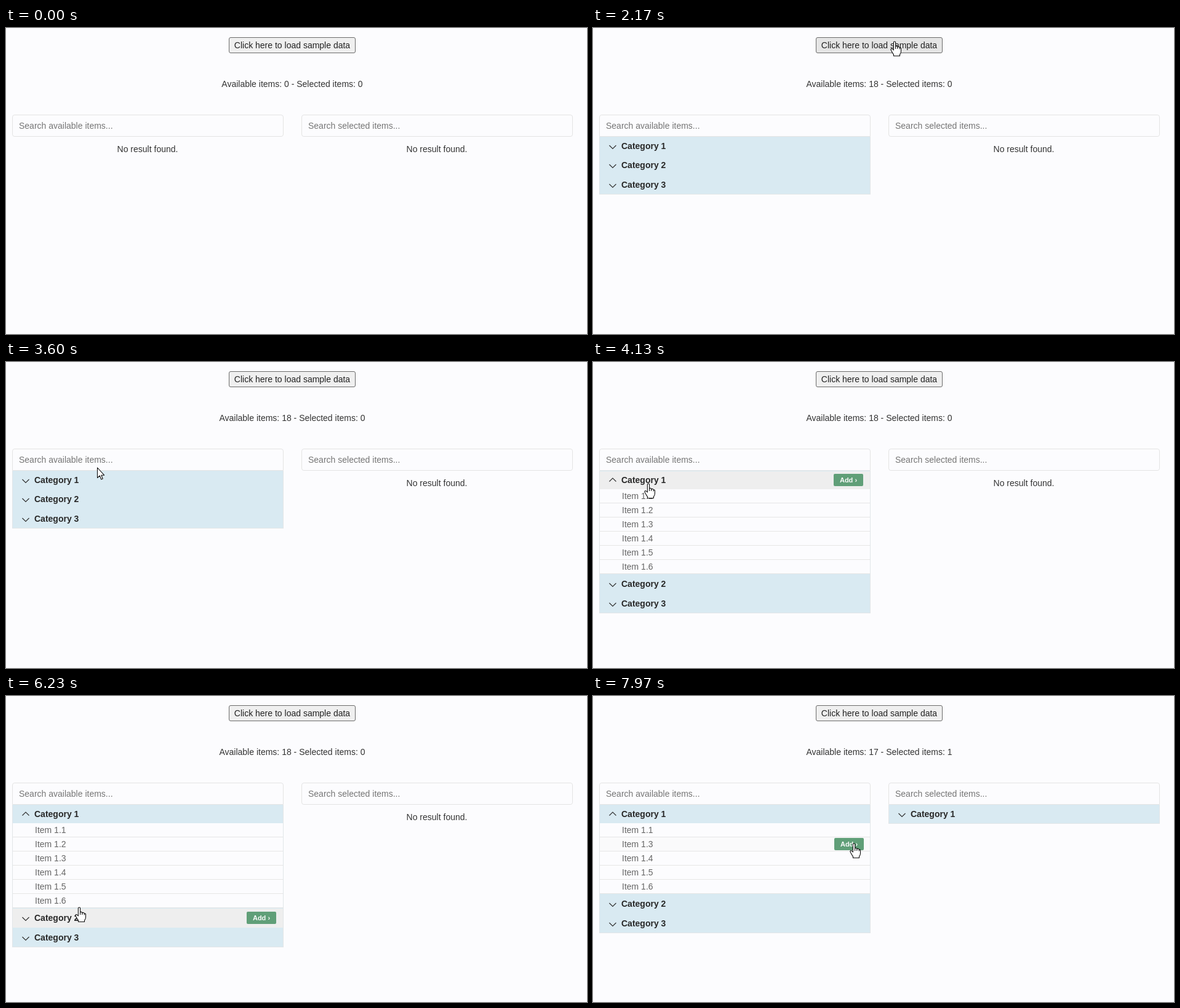
Animation, 944 px wide and 498 px high, one loop 8 s. Source, as an HTML page:

```html
<!DOCTYPE html>
<html lang="en">
<head>
<meta charset="utf-8">
<title>Dual list selector</title>
<style>
html, body { margin: 0; width: 100%; height: 100%; overflow: hidden; background: #fcfcfe; }
#stage { position: absolute; left: 0; top: 0; width: 944px; height: 498px; overflow: hidden;
  font: 14px/16px "Liberation Sans", Arial, sans-serif; color: #333; }
#view div, #view svg, #cursor { position: absolute; box-sizing: border-box; white-space: pre; }
.center { text-align: center; }
.load { left: 362px; top: 15px; width: 206px; height: 26px; line-height: 24px;
  border: 1px solid #6b6b6b; border-radius: 3px; background: #efefef; color: #222; }
.load.over { background: #e5e5e5; }
.load.down { background: #f5f5f5; }
.search { top: 141px; width: 441px; height: 36px; border: 1px solid #e4e4e4; border-radius: 4px;
  padding: 0 10px; line-height: 34px; color: #757575; }
.search.open { border-radius: 4px 4px 0 0; }
.list { top: 177px; width: 441px; border: solid #e2e6e8; border-width: 0 1px 1px; overflow: hidden; }
.cat { left: 0; width: 439px; background: #d9eaf2; }
.cat.over { background: #eee; border-top: 1px solid #d9eaf2; }
.name { font-weight: bold; color: #282828; }
.item { color: #666; }
.lit { left: 0; width: 439px; background: #fafafb; }
.rule { left: 0; width: 439px; height: 1px; background: #e6e6e6; }
.add { width: 48px; height: 20px; border-radius: 2px; background: #609f78; color: #f8faf9;
  font: bold 11px/20px "Liberation Sans", Arial, sans-serif; text-align: center; }
#cursor { left: 0; top: 0; overflow: visible; }
</style>
</head>
<body>
<div id="stage">
  <div id="view"></div>
  <svg id="cursor" width="1" height="1" fill="#fff" stroke="#111" stroke-width="1.1" stroke-linejoin="round">
    <path id="arrow" d="M.5 0V16.5L4.3 13L6.7 19L9.2 18L6.9 12.2H11.6Z"/>
    <g id="hand">
      <path d="M-1.6 1.6Q-1.6 0 0 0Q1.6 0 1.6 1.6V8Q2.2 7 3.6 7.5Q4.8 8 4.8 9Q6 8 7.3 8.7Q8.4 9.3 8.3 10.3Q10 9.7 10.5 11V16Q10.5 19 8.5 21V23.5H-1.5V21Q-3 19.5-5.5 14.5Q-6.8 12.3-5.3 11.7Q-3.8 11.2-1.6 14Z"/>
      <path fill="none" d="M1.6 8V12M4.8 9V12M8.3 10.3V12.5"/>
    </g>
  </svg>
</div>
<script>
const LOOP = 8000, APPEAR = 430, PRESS = 970, LOAD = 1970, EXPAND = 3860, ADD = 7480;
const LEFT = 10, RIGHT = 480, TOP = 177, FIRST_ITEM = 207, ROW = 23;

// Each move: start, end, from x, y, to x, y
const MOVES = [
  [3000, 3800, 490, 22, 90, 198],
  [4570, 5300, 90, 198, 121, 390],
  [5450, 6210, 121, 390, 119, 344],
  [6230, 7150, 119, 344, 424, 240]
];

const view = document.getElementById('view');
const cursor = document.getElementById('cursor');
const arrow = document.getElementById('arrow');
const hand = document.getElementById('hand');

function pointerAt(t) {
  let point = { x: 490, y: 22 };
  for (const [start, end, x0, y0, x1, y1] of MOVES) {
    if (t < start) break;
    const p = Math.min(1, (t - start) / (end - start));
    const e = (1 - Math.cos(Math.PI * p)) / 2;
    point = { x: x0 + (x1 - x0) * e, y: y0 + (y1 - y0) * e };
  }
  return point;
}

// Rows of the left list, in stage coordinates
function leftRows(t) {
  if (t < LOAD) return [];
  const numbers = t < EXPAND ? [] : t < ADD ? [1, 2, 3, 4, 5, 6] : [1, 3, 4, 5, 6];
  const shift = numbers.length * ROW;
  const cat = (n, mid, top, bottom) => ({ cat: true, label: 'Category ' + n, mid, top, bottom, open: n === 1 && shift > 0 });
  const item = (n, i) => {
    const top = FIRST_ITEM + i * ROW;
    return { label: 'Item 1.' + n, mid: top + 11, top, bottom: top + ROW };
  };
  return [
    cat(1, 192, TOP, FIRST_ITEM),
    ...numbers.map(item),
    cat(2, 223 + shift, 207 + shift, 239 + shift),
    cat(3, 255 + shift, 239 + shift, 271 + shift)
  ];
}

const box = (cls, style, text = '') => `<div class="${cls}" style="${style}">${text}</div>`;
const label = (cls, x, mid, text) => box(cls, `left:${x}px;top:${mid - 8}px`, text);
const centered = (mid, x, width, text) => box('center', `left:${x}px;top:${mid - 8}px;width:${width}px`, text);

function chevron(y, open) {
  const d = open ? 'M.5 6.5L6 1L11.5 6.5' : 'M.5 1L6 6.5L11.5 1';
  return `<svg style="left:15px;top:${y}px" width="12" height="8"><path d="${d}" fill="none" stroke="#333" stroke-width="1.2"/></svg>`;
}

function rowHtml(row, over) {
  const top = row.top - TOP, mid = row.mid - TOP, height = row.bottom - row.top;
  const area = `top:${top}px;height:${height}px`;
  const add = over ? box('add', `left:${row.cat ? 380 : 381}px;top:${mid - 10}px`, 'Add ›') : '';
  if (row.cat) {
    return box('cat' + (over ? ' over' : ''), area) +
      chevron(mid - (row.open ? 4 : 2), row.open) + label('name', 35, mid, row.label) + add;
  }
  return (over ? box('lit', area) : '') + box('rule', `top:${top + height - 1}px`) +
    label('item', 36, mid, row.label) + add;
}

function panel(x, word, rows, hovered) {
  const search = box('search' + (rows.length ? ' open' : ''), `left:${x}px`, `Search ${word} items...`);
  if (!rows.length) return search + centered(197, x, 440, 'No result found.');
  const height = rows[rows.length - 1].bottom - TOP;
  return search + box('list', `left:${x}px;height:${height}px`, rows.map(r => rowHtml(r, r === hovered)).join(''));
}

let lastKey;
function draw(t) {
  const { x, y } = pointerAt(t);
  const shown = t >= APPEAR;
  const rows = leftRows(t);
  const hovered = shown && x > LEFT && x < 451 ? rows.find(r => y + 2 >= r.top && y + 2 < r.bottom) : undefined;
  const onButton = shown && x > 362 && x < 568 && y > 15 && y < 41;
  const pressed = onButton && t >= PRESS && t < PRESS + 100;
  const onAdd = hovered && x > 391 && x < 440;
  const pointing = onButton || onAdd || (hovered && hovered.cat);

  cursor.style.display = shown ? '' : 'none';
  cursor.style.transform = `translate(${Math.round(x)}px,${Math.round(y)}px)`;
  hand.style.display = pointing ? '' : 'none';
  arrow.style.display = pointing ? 'none' : '';

  const added = t >= ADD ? 1 : 0;
  const available = t < LOAD ? 0 : 18 - added;
  const key = [available, rows.length, hovered && hovered.label, onButton, pressed].join();
  if (key === lastKey) return;
  lastKey = key;
  const chosen = added ? [{ cat: true, label: 'Category 1', mid: 192, top: TOP, bottom: 208 }] : [];
  view.innerHTML =
    box('load center' + (pressed ? ' down' : onButton ? ' over' : ''), '', 'Click here to load sample data') +
    centered(91, 0, 930, `Available items: ${available} - Selected items: ${added}`) +
    panel(LEFT, 'available', rows, hovered) +
    panel(RIGHT, 'selected', chosen);
}

const begin = performance.now();
function tick() {
  draw((performance.now() - begin) % LOOP);
  requestAnimationFrame(tick);
}
tick();
</script>
</body>
</html>
```
